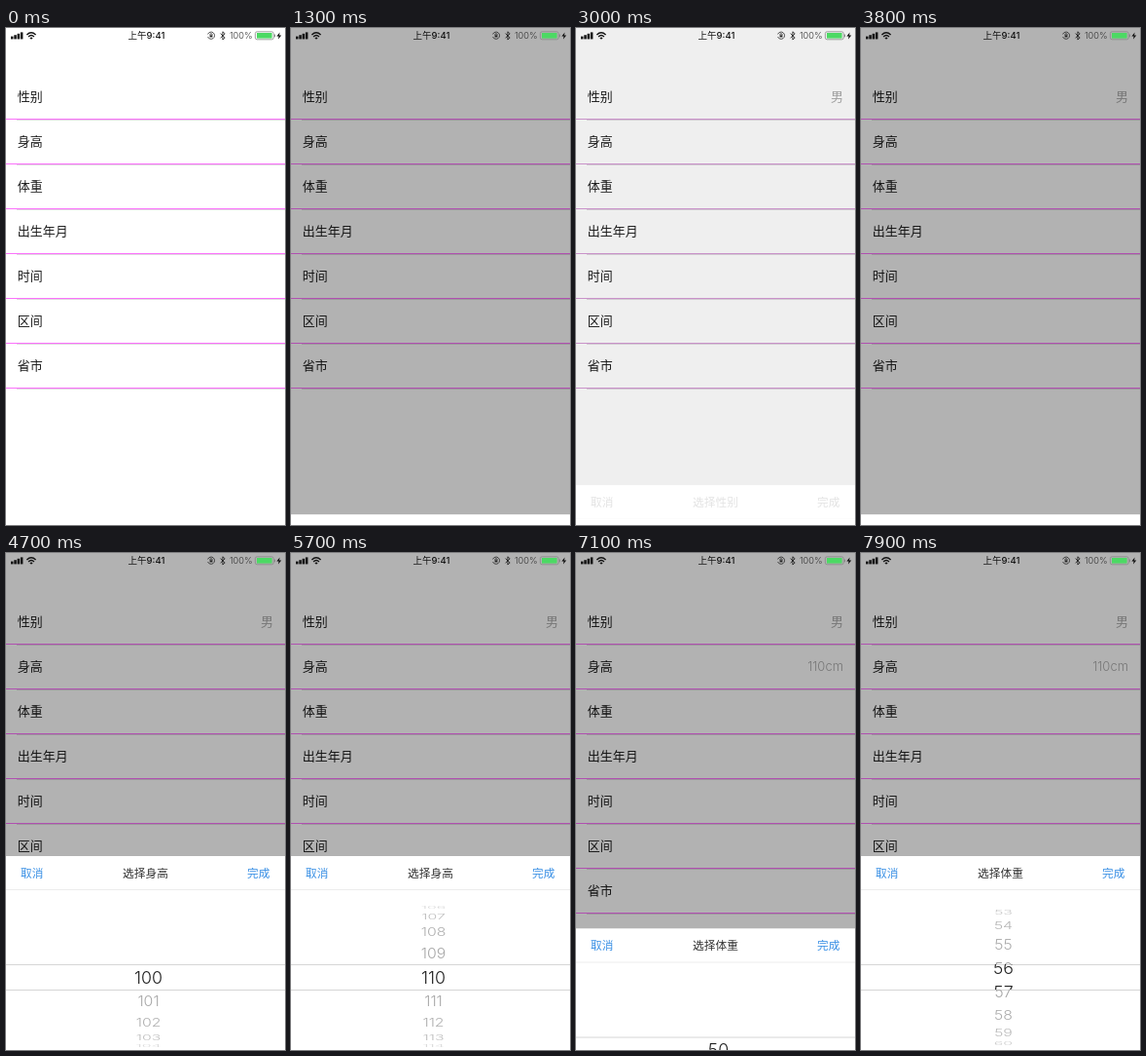
These frames come from a looping animation (287 by 510 pixels, 8000 ms). An HTML page with a canvas:

```html
<!DOCTYPE html>
<html lang="zh-CN">
<head>
<meta charset="utf-8">
<style>
html, body { margin: 0; width: 100%; height: 100%; overflow: hidden; background: #fff; }
canvas { display: block; width: 287px; height: 510px; }
</style>
</head>
<body>
<canvas></canvas>
<script>
const W = 287, H = 510, LOOP = 8000, STEP = 100;
const SLIDE = 450, SHEET = 199, MID = 435, BAND = 13, ROW = 46;
const RADIUS = 72, TILT = 19.9 * Math.PI / 180;
const FONT = 'Inter, "Noto Sans CJK SC", "Noto Sans CJK", sans-serif';
const ROWS = ['性别', '身高', '体重', '出生年月', '时间', '区间', '省市'];

const clamp = x => Math.min(1, Math.max(0, x));
const smooth = x => x * x * (3 - 2 * x);
const slide = (t, start) => smooth(clamp((t - start) / SLIDE));
const range = first => Array.from({ length: 60 }, (_, i) => String(first + i));

const SHEETS = [
  { row: 0, open: 1237, close: 2681, value: '男', items: ['男', '女'], pos: () => 0 },
  { row: 1, open: 3737, close: 5785, value: '110cm', items: range(100), lines: true,
    pos: t => 10 * (1 - (1 - clamp((t - 4850) / 850)) ** 2) },
  { row: 2, open: 6837, close: Infinity, value: '', items: range(50), lines: true,
    pos: t => 6.37 * clamp((t - 7640) / 260) ** 1.4 }
];

const canvas = document.querySelector('canvas');
const dpr = window.devicePixelRatio || 1;
canvas.width = W * dpr;
canvas.height = H * dpr;
const c = canvas.getContext('2d');

function rect(x, y, w, h, color) {
  c.fillStyle = color;
  c.fillRect(x, y, w, h);
}

// y is the vertical middle of the glyphs
function text(s, x, y, size, color, align = 'left', weight = 350) {
  c.font = `${weight} ${size}px ${FONT}`;
  c.textAlign = align;
  c.fillStyle = color;
  c.fillText(s, x, y + size * 0.37);
}

function stroke(path, width, color = '#111') {
  c.lineWidth = width;
  c.strokeStyle = color;
  c.stroke(new Path2D(path));
}

function drawStatus() {
  for (let i = 0; i < 4; i++) rect(5 + i * 3.3, 8.6 - i * 1.4, 2.5, 2.8 + i * 1.4, '#111');
  stroke('M21.4 6.9Q26 2.6 30.6 6.9M23.1 8.9Q26 6.2 28.9 8.9', 1.4);
  c.fillStyle = '#111';
  c.fill(new Path2D('M24.4 10.2Q26 8.9 27.6 10.2L26 11.8Z'));
  text('上午9:41', 144.5, 7.6, 9.5, '#111', 'center', 500);
  stroke('M207.6 6.4A3.6 3.6 0 1 1 207.6 9M209.9 7.4V6.8A1.1 1.1 0 0 1 212.1 6.8V7.4', 0.7);
  rect(209.6, 7.4, 2.8, 2, '#222');
  stroke('M220.6 5.6L225.2 10L222.9 12V3.8L225.2 5.8L220.6 10.2', 0.8);
  text('100%', 253.5, 7.6, 9.2, '#333', 'right');
  c.lineWidth = 0.8;
  c.strokeStyle = '#888';
  c.beginPath();
  c.roundRect(256.4, 3.8, 18.8, 8, 1.8);
  c.stroke();
  rect(276, 6.5, 1, 2.8, '#888');
  rect(258, 5, 15.6, 5.6, '#4cd964');
  c.fillStyle = '#111';
  c.fill(new Path2D('M281.6 4.4L278.4 8.5H280.6L280 11.6L283.3 7.4H281.1Z'));
}

function drawList(t, lineColor) {
  ROWS.forEach((label, i) => {
    const y = 70.6 + ROW * i, line = 93 + ROW * i;
    text(label, 11.8, y, 13, '#1c1c1c');
    const done = SHEETS.find(s => s.row === i && t >= s.close);
    if (done) text(done.value, 275, y, 13, '#aaa', 'right');
    rect(0, line, W, 1, lineColor);
    rect(11, line + 1, W, 1, '#e0d6e0');
  });
}

function drawWheel(items, pos, top, alpha) {
  const mid = MID + top;
  const labels = (size, color, fade) => items.forEach((s, i) => {
    const a = (i - pos) * TILT;
    if (Math.abs(a) > 1.45) return;
    c.save();
    c.translate(W / 2 + 3, mid + RADIUS * Math.sin(a));
    c.scale(1, Math.cos(a));
    c.globalAlpha = alpha * (fade ? Math.sqrt(Math.cos(a)) : 1);
    text(s, 0, 0, size, color, 'center');
    c.restore();
  });
  const clipped = (rects, draw) => {
    c.save();
    c.beginPath();
    rects.forEach(([y, h]) => c.rect(0, y, W, h));
    c.clip();
    draw();
    c.restore();
  };
  clipped([[mid - 80, 80 - BAND], [mid + BAND, 80 - BAND]], () => labels(15.8, '#a4a4a4', true));
  clipped([[mid - BAND, 2 * BAND]], () => labels(17.8, '#222', false));
}

function drawSheet(s, t, out) {
  const shift = SHEET * (1 - slide(t, s.open) + out);
  const top = H - SHEET + shift;
  const alpha = 1 - out;
  // tints turn grey while the sheet is leaving
  const tint = color => out > 0.05 ? '#777' : color;
  c.globalAlpha = alpha;
  rect(0, 0, W, top, 'rgba(0,0,0,.3)');
  rect(0, top, W, H - top, '#fff');
  text('取消', 15, top + 17.2, 11.7, tint('#3a90e5'));
  text('选择' + ROWS[s.row], W / 2, top + 17.2, 11.7, tint('#333'), 'center');
  text('完成', 271.5, top + 17.2, 11.7, tint('#3a90e5'), 'right');
  rect(0, top + 34, W, 1, '#ececec');
  if (s.lines) [-BAND, BAND].forEach(d => rect(0, MID + d + shift, W, 1, '#d6d6d6'));
  drawWheel(s.items, s.pos(t), shift, alpha);
  c.globalAlpha = 1;
}

function draw(t) {
  c.setTransform(dpr, 0, 0, dpr, 0, 0);
  rect(0, 0, W, H, '#fff');
  const sheet = SHEETS.find(s => t >= s.open && t < s.close + SLIDE);
  const out = sheet ? slide(t, sheet.close) : 0;
  drawList(t, out > 0 ? '#d69cd6' : '#fb72fb');
  if (sheet) drawSheet(sheet, t, out);
  drawStatus();
}

const begin = performance.now();
function frame() {
  const t = (performance.now() - begin) % LOOP;
  draw(Math.floor(t / STEP) * STEP); // ten pictures a second
  requestAnimationFrame(frame);
}
frame();
</script>
</body>
</html>
```
